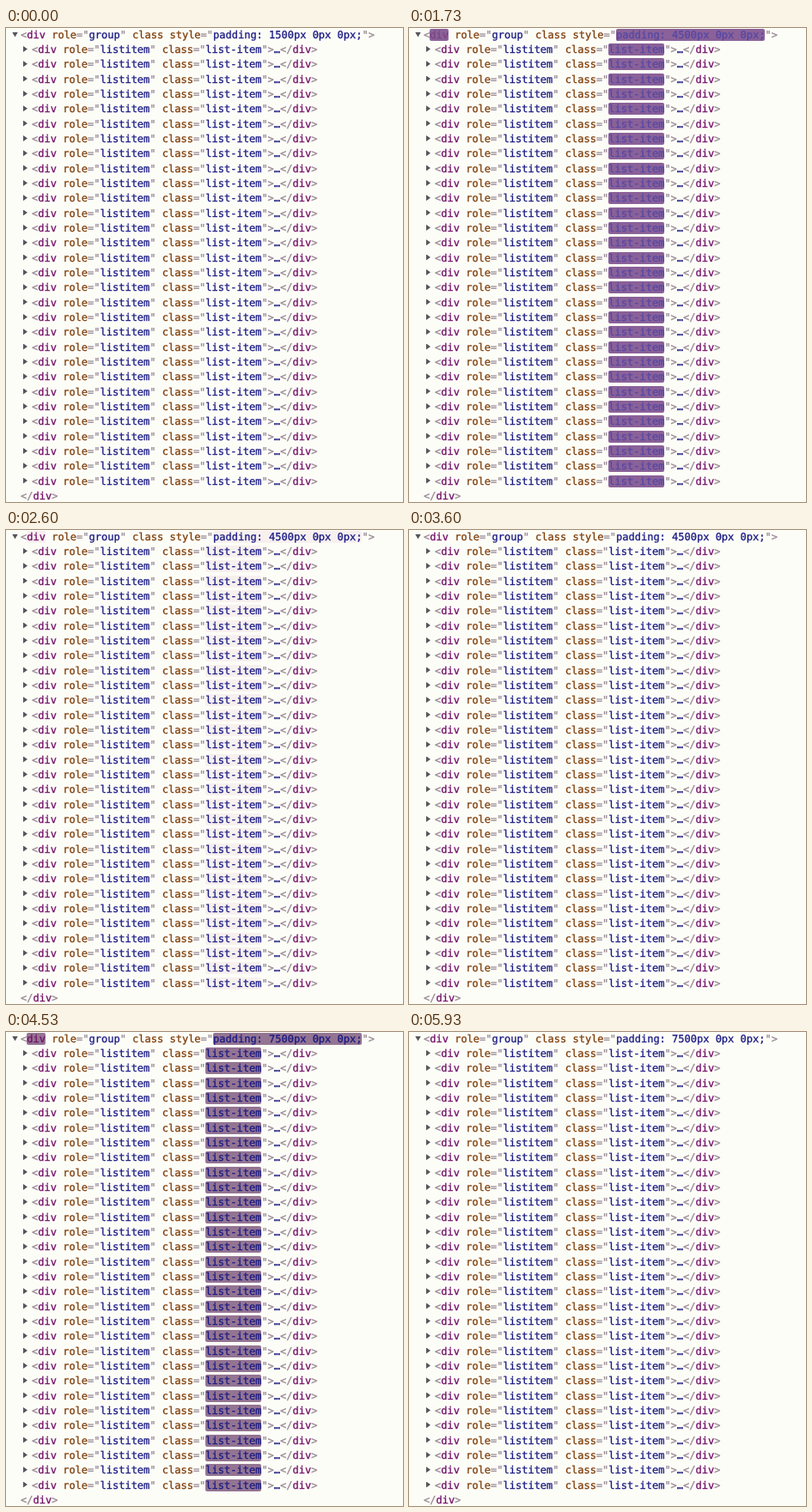
An HTML page that plays this animation: 462 px wide and 552 px high, repeating every 5990 ms.

```html
<!DOCTYPE html>
<html lang="en">
<head>
<meta charset="utf-8">
<title>Element list</title>
<style>
html, body { margin: 0; width: 100%; height: 100%; overflow: hidden; background: #fdfdf8; }
#tree {
  position: absolute; inset: 0; overflow: hidden;
  font: 12px/17px "DejaVu Sans Mono", "Liberation Mono", monospace;
  text-rendering: geometricPrecision;
  -webkit-text-stroke: .3px;
  color: #988a94;
}
.row { position: absolute; left: 17px; white-space: pre; }
.item { left: 30px; }
.row::before { content: ""; position: absolute; background: #55555a; }
.open::before {
  left: -10px; top: 5px; width: 7px; height: 6px;
  clip-path: polygon(0 0, 100% 0, 50% 100%);
}
.item::before {
  left: -10px; top: 4px; width: 5px; height: 7px;
  clip-path: polygon(0 0, 100% 50%, 0 100%);
}
.tag { --ink: #74106a; --hot: #7d4686; }
.key { --ink: #7e3d08; }
.val { --ink: #1a1a84; --hot: #584aa6; }
.tag, .key, .val { color: var(--ink); }

.flash { border-radius: 2px; animation: flash 5990ms infinite; }
@keyframes flash {
  0%, 28.82%, 52.2%, 74.5%, 97.88%, 100% { background-color: #fdfdf800; color: var(--ink); }
  28.83%, 74.51% { background-color: #8a6098; color: var(--hot); }
  29.95%, 75.63% {
    background-color: #937492; color: var(--ink);
    animation-timing-function: cubic-bezier(.1, .3, .3, 1);
  }
  43.35%, 89.03% { background-color: #f7f0ef; color: var(--ink); }
}

/* Leading digit of the padding: three stacked glyphs, one shown at a time */
.digit { position: relative; }
.digit span { animation: one 5990ms step-end infinite; }
.digit span + span { position: absolute; left: 0; top: 0; line-height: 14px; animation-name: four; }
.digit span + span + span { animation-name: seven; }
@keyframes one { 0% { opacity: 1; } 28.83%, 100% { opacity: 0; } }
@keyframes four { 0% { opacity: 0; } 28.83% { opacity: 1; } 74.51%, 100% { opacity: 0; } }
@keyframes seven { 0% { opacity: 0; } 74.51%, 100% { opacity: 1; } }
</style>
</head>
<body>
<div id="tree"></div>
<script>
const PITCH = 52 / 3, TOP = -0.4, ITEMS = 30;
const span = (cls, text) => `<span class="${cls}">${text}</span>`;
const attr = (name, value, cls = "val") => ` ${span("key", name)}="${span(cls, value)}"`;
const close = `&lt;/${span("tag", "div")}&gt;`;
const digit = '<span class="digit"><span>1</span><span>4</span><span>7</span></span>';

const head = `&lt;${span("tag flash", "div")}${attr("role", "group")} ${span("key", "class")}` +
  `${attr("style", `padding: ${digit}500px 0px 0px;`, "val flash")}&gt;`;
const item = `&lt;${span("tag", "div")}${attr("role", "listitem")}` +
  `${attr("class", "list-item", "val flash")}&gt;${span("val", "…")}${close}`;

const rows = [["open", head], ...Array(ITEMS).fill(["item", item]), ["end", close]];
document.getElementById("tree").innerHTML = rows.map(([cls, html], i) =>
  `<div class="row ${cls}" style="top:${(i * PITCH + TOP).toFixed(2)}px">${html}</div>`).join("");
</script>
</body>
</html>
```
